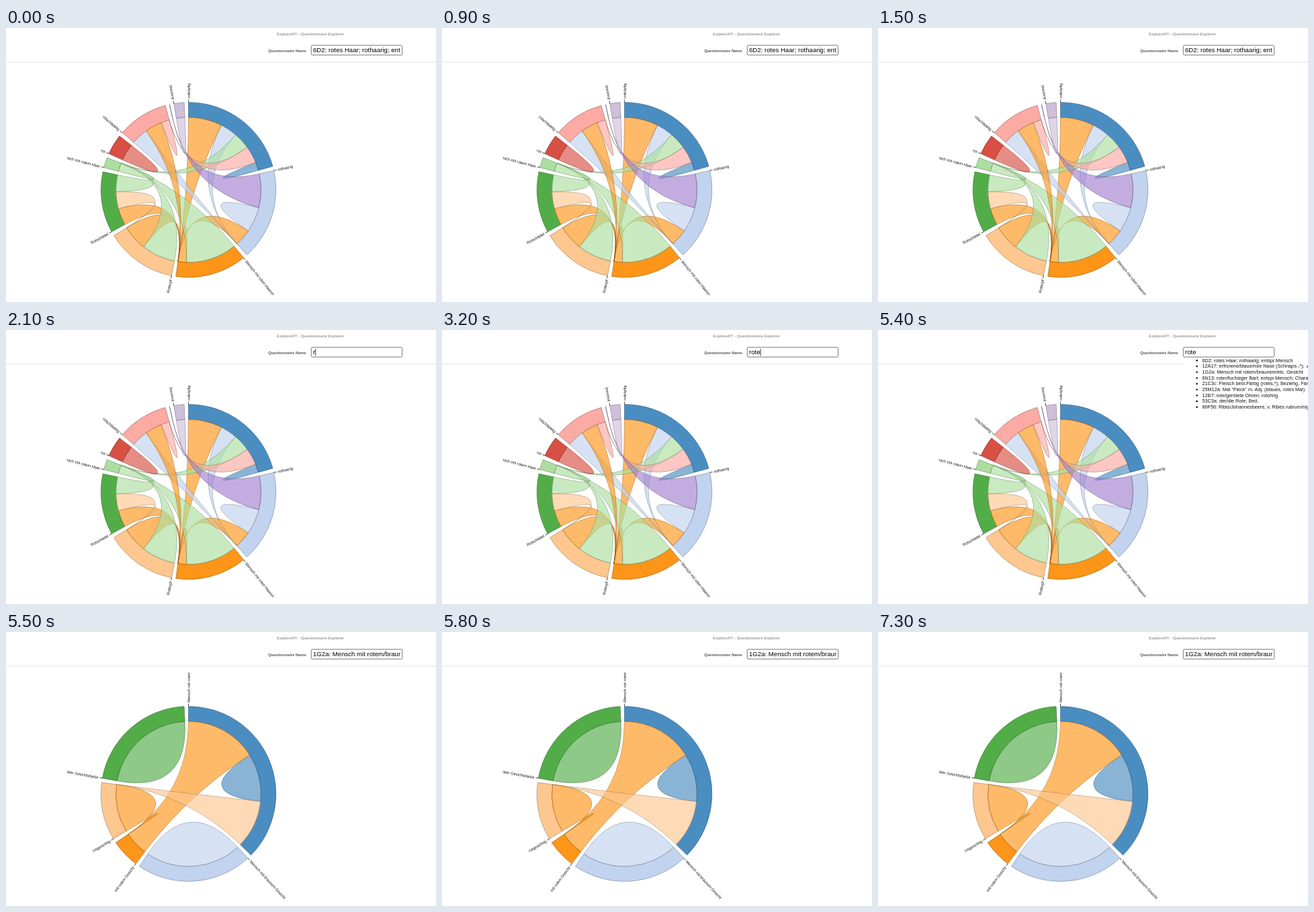
An HTML page that plays this animation: 640x408 px, repeating every 7400 ms.

```html
<!DOCTYPE html>
<html lang="de">
<head>
<meta charset="utf-8">
<title>Questionnaire Explorer</title>
<style>
  html, body { margin: 0; width: 100%; height: 100%; overflow: hidden; background: #fff; }
  svg { display: block; width: 100vw; height: 100vh; font-family: "Liberation Sans", Arial, sans-serif; }
  .bold { font-size: 5.8px; font-weight: bold; }
  .label { font-size: 5.8px; fill: #111; }
  .field { font-size: 9.6px; fill: #000; }
  .item { font-size: 7.25px; fill: #111; }
</style>
</head>
<body>
<svg id="stage" viewBox="0 0 640 408">
  <defs>
    <clipPath id="chartClip"><rect x="90.5" y="60" width="480" height="338"/></clipPath>
    <clipPath id="fieldClip"><rect x="456" y="26" width="131" height="14"/></clipPath>
  </defs>
  <rect width="640" height="408" fill="#fff"/>
  <text class="bold" x="403.3" y="11" fill="#999">ExploreAT! - Questionnaire Explorer</text>
  <path d="M0 50.8H640" stroke="#dedede" stroke-width=".9"/>
  <text class="bold" x="390.3" y="36" fill="#555">Questionnaire Name</text>
  <rect x="454.3" y="25.8" width="135.4" height="14.4" rx="1.6" fill="#fff" stroke="#686868" stroke-width=".9"/>
  <g clip-path="url(#fieldClip)">
    <text class="field" id="field" x="457" y="36.3"></text>
    <path id="caret" stroke="#000" stroke-width=".8"/>
  </g>
  <g id="list"><rect x="454" y="41" width="186" height="79" fill="#fff"/></g>
</svg>
<script>
const NS = 'http://www.w3.org/2000/svg';
const $ = id => document.getElementById(id);
const LOOP = 7400, R = 130.3, INNER = 108, PAD = 0.05, CX = 271.6, CY = 241;
const COLORS = ['#4a8dc1', '#c1d3ee', '#fd9518', '#fdc78f', '#52ad48',
                '#acdf9f', '#d85044', '#fbaaa4', '#a482cf', '#cebfda'];

const charts = [
  {
    labels: ['rotköpfig', 'rothaarig', 'Mensch mit roten Haaren', 'Rotkopf', 'Rotschädel',
             'Mensch mit rotem Haar', 'rot', 'rotschädelig', '', 'brennrot'],
    // per group: {other group: weight}
    links: [{0: 1, 1: 2, 2: 4, 5: 2, 7: 2}, {1: 3, 2: 2, 8: 4}, {2: 1, 5: 6}, {2: 3, 5: 4},
            {2: 2, 3: 2, 5: 2}, {5: 1}, {6: 2}, {1: 2, 2: 2, 7: 1}, {}, {9: 1}]
  },
  {
    labels: ['Mensch mit rotem Gesicht', 'Mensch mit braunem Gesicht', 'mit rotem Gesicht',
             'rotgesichtig', 'mit dunkler Gesichtsfarbe'],
    links: [{0: 2, 2: 3, 3: 2}, {1: 4}, {0: 1}, {2: 2}, {4: 4}]
  }
];

const items = [
  '6D2: rotes Haar; rothaarig; entspr.Mensch',
  '12A17: erfrorene/blaue/rote Nase (Schnaps-,*); -(n)',
  '1G2a: Mensch mit rotem/braunem/etc. Gesicht',
  '6N13: roter/fuchsiger Bart; entspr.Mensch; Charakter',
  '21C3c: Fleisch best.Färbg (rotes,*); Beziehg. Farbe',
  '25M12a: Mal "Fleck" m. Adj. (blaues, rotes Mal)',
  '12B7: rote/gerötete Ohren; rotohrig',
  '53C3a: der/die Rote; Bed.',
  '86F56: Ribis/Johannesbeere, v. Ribes rubrum/nigrum'
];

function add(parent, tag, attrs, text) {
  const el = document.createElementNS(NS, tag);
  for (const key in attrs) el.setAttribute(key, attrs[key]);
  if (text) el.textContent = text;
  return parent.appendChild(el);
}

const darker = hex =>
  'rgb(' + [1, 3, 5].map(i => Math.round(parseInt(hex.substr(i, 2), 16) * 0.6)) + ')';
const point = (r, a) => `${(r * Math.sin(a)).toFixed(2)} ${(-r * Math.cos(a)).toFixed(2)}`;
const arc = (r, from, to) =>
  `A${r} ${r} 0 ${+(Math.abs(to - from) > Math.PI)} ${+(to > from)} ${point(r, to)}`;

// Angular spans of every group and of every link inside it, largest first.
function layout(links) {
  const n = links.length;
  const sum = o => Object.values(o).reduce((a, b) => a + b, 0);
  const unit = (2 * Math.PI - PAD * n) / links.reduce((s, o) => s + sum(o), 0);
  let angle = 0;
  return links.map(weights => {
    const start = angle, parts = [];
    const order = links.map((_, j) => j)
      .sort((a, b) => (weights[b] || 0) - (weights[a] || 0) || a - b);
    for (const j of order) {
      const value = weights[j] || 0;
      parts[j] = { start: angle, end: angle += value * unit, value };
    }
    const group = { start, end: angle, parts };
    angle += PAD;
    return group;
  });
}

function ribbon(s, t) {
  const open = `M${point(INNER, s.start)}${arc(INNER, s.start, s.end)}`;
  const back = `Q0 0 ${point(INNER, s.start)}Z`;
  if (s === t) return open + back;
  return `${open}Q0 0 ${point(INNER, t.start)}${arc(INNER, t.start, t.end)}${back}`;
}

function drawLabel(parent, text, angle) {
  const deg = angle * 180 / Math.PI, flip = angle > Math.PI;
  const g = add(parent, 'g', { transform: `rotate(${deg - 90}) translate(${R})` });
  add(g, 'path', { d: 'M0 0H4', stroke: '#000', 'stroke-width': 0.7 });
  add(g, 'text', {
    class: 'label', x: flip ? -6 : 6, dy: '.35em',
    'text-anchor': flip ? 'end' : 'start',
    transform: flip ? 'rotate(180)' : ''
  }, text);
}

function drawChart({ labels, links }) {
  const clip = add($('stage'), 'g', { 'clip-path': 'url(#chartClip)' });
  const root = add(clip, 'g', { transform: `translate(${CX} ${CY})`, 'stroke-width': 0.6 });
  const groups = layout(links);
  groups.forEach(({ start, end }, i) => {
    add(root, 'path', {
      d: `M${point(R, start)}${arc(R, start, end)}L${point(INNER, end)}${arc(INNER, end, start)}Z`,
      fill: COLORS[i], stroke: darker(COLORS[i])
    });
    if (labels[i]) drawLabel(root, labels[i], start);
  });
  for (let i = 0; i < groups.length; i++) {
    for (let j = i; j < groups.length; j++) {
      const a = groups[i].parts[j], b = groups[j].parts[i];
      if (!a.value && !b.value) continue;
      const swap = a.value < b.value;
      const color = COLORS[swap ? i : j];
      add(root, 'path', {
        d: swap ? ribbon(b, a) : ribbon(a, b),
        fill: color, 'fill-opacity': 0.65, stroke: darker(color), 'stroke-opacity': 0.8
      });
    }
  }
  return clip;
}

const views = charts.map(drawChart);
items.forEach((text, i) => {
  const y = 45.2 + i * 8.68;
  add($('list'), 'circle', { cx: 474.6, cy: y + 0.2, r: 1.3, fill: '#111' });
  add($('list'), 'text', { class: 'item', x: 482.5, y: y + 2.5 }, text);
});
$('stage').appendChild($('list'));

// [time, field text]
const typing = [[0, items[0]], [1700, ''], [2000, 'r'], [2500, 'ro'], [2800, 'rot'],
                [3200, 'rote'], [5500, items[2]]];
const CLEAR = 1700, LIST = 4100, PICK = 5500;

const show = (el, on) => el.setAttribute('visibility', on ? 'visible' : 'hidden');

function render(t) {
  const [since, text] = typing.filter(step => step[0] <= t).pop();
  if ($('field').textContent !== text) $('field').textContent = text;
  const x = 457.5 + (text ? $('field').getComputedTextLength() : 0);
  $('caret').setAttribute('d', `M${x} 28V38.4`);
  show($('caret'), t >= CLEAR && t < LIST && (t - since) % 1000 < 500);
  show($('list'), t >= LIST && t < PICK);
  show(views[0], t < PICK);
  show(views[1], t >= PICK);
}

const begin = performance.now();
function tick() {
  render((performance.now() - begin) % LOOP);
  requestAnimationFrame(tick);
}
tick();
</script>
</body>
</html>
```
